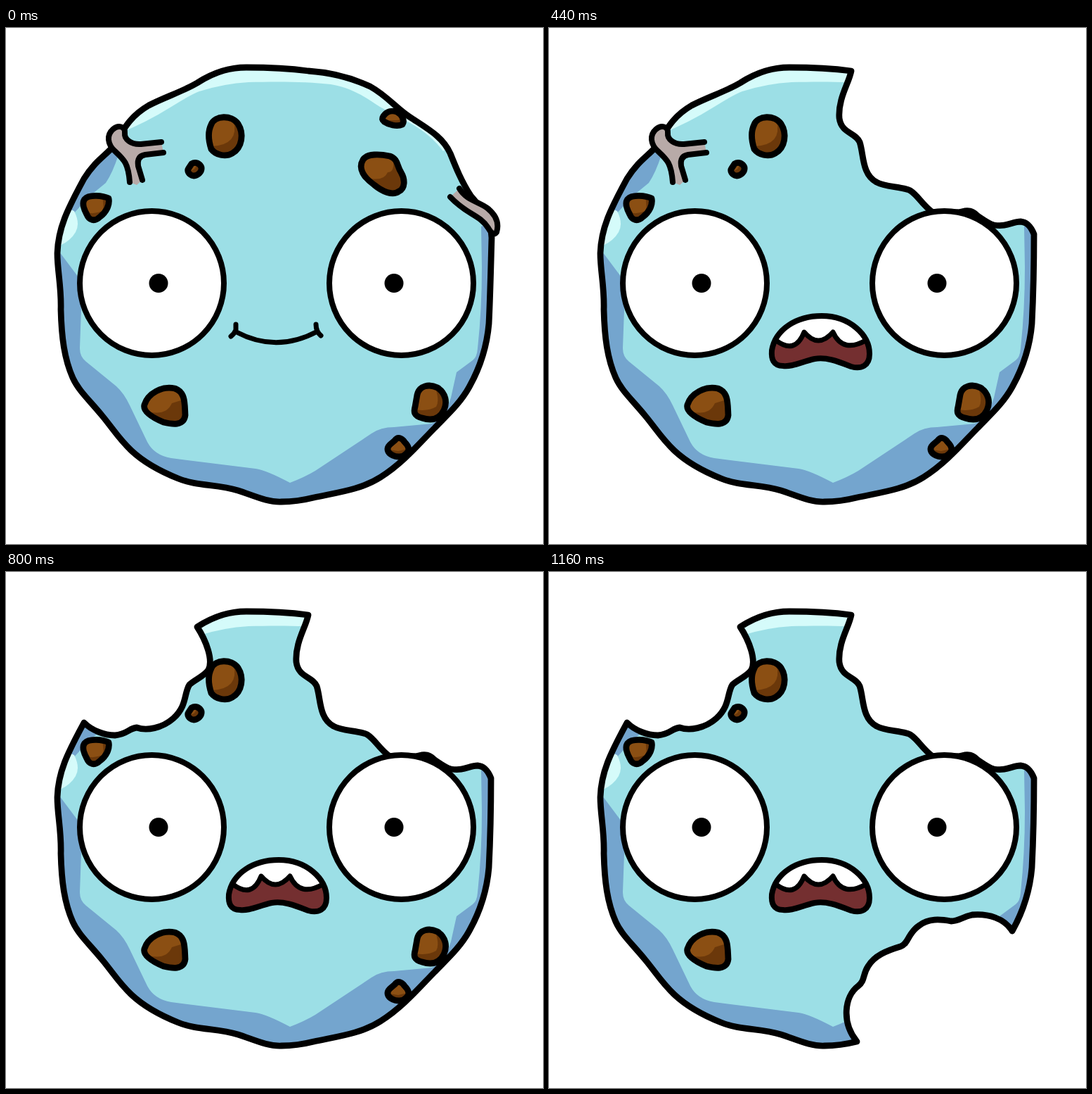
An HTML page for the animation above (1.76 s loop, 764x733 px).

```html
<!DOCTYPE html>
<html lang="en">
<head>
<meta charset="utf-8">
<title>Bitten cookie</title>
<style>
  html, body { margin: 0; width: 100%; height: 100%; overflow: hidden; background: #fff; }
  svg { display: block; width: 100%; height: 100%; }
  .line { fill: none; stroke: #000; stroke-width: 8; stroke-linecap: round; stroke-linejoin: round; }
  .bold { stroke-width: 8.8; }
  .fine { stroke-width: 7; }
  .dark { fill: #74a5ce; }
  .light { fill: #d5fbfa; }
  .vein { fill: #b8aaa8; }
</style>
</head>
<body>
<svg viewBox="0 0 764 733">
  <defs>
    <path id="body"/>
    <clipPath id="inside"><use href="#body"/></clipPath>
    <path id="lips" d="M317,458 C322,428 352,409 388,409 C428,409 456,436 456,463 C456,480 444,485 430,481 C412,474 395,467 378,470 C360,474 345,482 333,480 C319,480 316,470 317,458Z"/>
    <clipPath id="mouth"><use href="#lips"/></clipPath>
  </defs>
  <g id="cookie">
    <use href="#body" fill="#9cdfe6"/>
    <g clip-path="url(#inside)">
      <path class="dark" d="M60,300 L76,318 L100,350 Q106,358 107,400 L105,455 Q105,467 114,474 L157,509 Q168,519 176,536 L201,588 Q211,607 235,611 L355,626 Q370,628 404,646 Q425,638 440,629 L520,576 Q533,567 552,567 L606,562 Q625,552 633,525 L641,489 L664,472 Q670,468 671,455 Q677,400 677,340 L676,282 L700,270 V700 H60Z"/>
      <path class="dark" d="M150,160 L160,180 Q152,205 142,220 L120,238 L92,268 L80,240Z"/>
      <path class="light" d="M97,260 Q106,278 99,290 Q92,302 77,309 L68,300 L85,255Z"/>
      <path class="light" d="M160,150 Q200,134 235,112 Q262,95 275,90 Q310,79 345,77 C385,76 430,76 462,80 C495,86 510,98 532,112 L575,135 Q605,152 622,175 L660,140 L520,40 H300 L160,110Z"/>
    </g>
    <use href="#body" class="line bold"/>
    <g data-until="2">
      <path class="vein" d="M176,219 C174,192 168,187 155,175 C144,165 143,152 152,144 C160,137 170,140 169,149 C168,158 178,166 192,165 L221,162 L224,177 L198,180 Q186,182 188,196 L194,216 L186,223Z"/>
      <path class="line" d="M176,219 C174,192 168,187 155,175 C144,165 143,152 152,144 C160,137 170,140 169,149 C168,158 178,166 192,165 L221,162 M224,177 L198,180 Q186,182 188,196 L194,216"/>
    </g>
    <path data-until="1" class="line" style="fill:#b8aaa8" d="M645,228 C655,245 672,246 685,256 C700,268 701,280 698,290 C694,295 690,291 686,284 C674,265 655,265 632,240"/>
    <path data-from="1" d="M578,261 C592,252 604,254 613,264 L634,280 L600,274Z"/>
    <g id="chips"></g>
    <g id="eyes"></g>
    <path data-until="1" class="line fine" d="M328,432 Q385,462 443,431 M327,421 V429 Q325,434 320,438 M441,421 Q441,431 448,437"/>
    <g data-from="1">
      <use href="#lips" fill="#fff"/>
      <path clip-path="url(#mouth)" class="line fine" style="fill:#742f30" d="M322,443 Q350,465 363,432 Q383,456 404,432 Q418,463 452,443 L480,500 H290Z"/>
      <use href="#lips" class="line"/>
    </g>
  </g>
</svg>
<script>
const $ = id => document.getElementById(id);

// Rim pieces, clockwise from the lowest point; each bite swaps a whole piece for a bitten one.
const rim = {
  left: 'M392,673 C372,674 352,664 330,657 C300,648 272,651 245,640 C220,630 195,616 178,600 C160,583 152,569 137,551 C120,530 103,515 95,497 C83,470 79,440 78,400 C79,368 73,345 73,320 C74,285 87,258 111,214',
  topLeft: ['C126,190 140,182 150,171 C165,150 172,128 203,110 C226,98 252,90 272,78',
    'C122,225 140,232 155,232 C172,231 175,222 186,221 C200,226 222,222 238,208 C258,190 253,172 261,160 C270,152 282,148 288,139 C295,125 285,98 272,78'],
  top: 'C300,60 322,56 342,56 C375,56 400,57 430,61',
  topRight: ['C460,63 490,70 518,83 C545,98 556,116 580,130 C603,145 622,156 632,178 C640,198 648,218 661,238 C675,255 690,270 691,298',
    'C427,78 411,100 413,128 C416,150 436,148 442,162 C448,180 445,208 466,219 C480,227 500,224 514,231 C525,238 532,252 546,262 L582,262 C606,256 615,275 633,280 C652,283 659,275 671,275 C681,276 686,283 690,293'],
  right: 'C690,330 689,380 687,420 C684,455 673,485 659,510',
  lowRight: ['C645,535 625,552 610,568 C590,588 565,618 533,638 C505,656 470,660 438,667',
    'C648,492 625,485 602,487 C588,490 583,496 572,496 C556,493 540,492 527,502 C510,513 512,528 500,532 C480,538 463,545 454,560 C446,572 450,580 440,588 C420,603 416,640 438,667'],
  bottom: 'C422,671 408,673 392,673Z'
};

const outline = bites => [
  rim.left, rim.topLeft[+(bites > 1)], rim.top, rim.topRight[+(bites > 0)],
  rim.right, rim.lowRight[+(bites > 2)], rim.bottom
].join(' ');

// Chip shape, its lit side, and the bite that removes it.
const chips = [
  ['M292,137 C297,124 321,123 330,136 C339,150 336,170 322,178 C312,184 298,180 292,172 C288,160 287,147 292,137Z',
    'M292,137 C298,124 318,122 324,132 Q332,166 293,168Z', 9],
  ['M264,193 C270,189 276,193 278,198 C279,204 273,210 267,210 C260,209 257,203 260,199Z',
    'M264,193 L271,191 Q271,203 260,203Z', 9],
  ['M112,243 C118,236 138,238 146,242 C148,252 142,262 134,268 C126,276 118,273 115,265 C110,256 108,248 112,243Z',
    'M112,243 L137,240 Q140,255 137,260 Q125,265 115,262Z', 9],
  ['M537,125 C542,118 550,117 556,119 C563,123 568,131 564,137 C556,141 544,137 538,133 C534,130 535,128 537,125Z',
    'M538,125 Q550,116 561,125 Q563,131 555,131 L537,131Z', 1],
  ['M508,187 C514,178 532,179 546,182 C558,186 556,196 562,205 C568,215 568,228 559,232 C550,239 535,232 524,223 C510,213 500,200 508,187Z',
    'M508,187 Q535,178 551,187 Q553,205 543,205 Q538,217 519,214 Q505,198 508,187Z', 1],
  ['M197,535 C202,519 222,508 240,512 C256,517 254,535 255,550 C253,566 236,563 224,560 C210,554 194,545 197,535Z',
    'M197,535 C203,520 218,510 240,512 Q249,516 252,528 L236,533 Q228,551 203,545Z', 9],
  ['M585,521 C588,508 602,505 614,511 C626,519 628,532 623,543 C616,557 604,558 592,554 C580,551 580,545 582,538Z',
    'M585,521 Q595,505 611,511 Q617,530 612,538 Q600,545 583,542Z', 3],
  ['M553,586 C557,580 563,582 567,588 C573,594 575,600 570,604 C565,610 556,610 550,607 C542,603 541,597 546,592Z',
    'M553,586 L562,585 Q570,594 571,598 L558,601 L545,599Z', 3]
];

$('chips').innerHTML = chips.map(([shape, lit, until]) => `<g data-until="${until}">
  <path d="${shape}" fill="#6b380a"/><path d="${lit}" fill="#8b4f13"/><path d="${shape}" class="line bold"/></g>`).join('');

$('eyes').innerHTML = [[207.5, 217], [562.5, 552]].map(([eye, pupil]) =>
  `<circle cx="${eye}" cy="362.5" r="102.5" class="line" style="fill:#fff"/>
   <circle cx="${pupil}" cy="362.5" r="13.5"/>`).join('');

// Start in ms, tilt in degrees, bites taken.
const steps = [
  [0, 0, 0],
  [320, 1.55, 1], [360, -0.9, 1], [440, 0, 1],
  [680, -2.25, 2], [760, 0.6, 2], [800, 0, 2],
  [1080, -1.3, 3], [1120, 0.9, 3], [1160, 0, 3]
];
const loop = 1760;
const changing = document.querySelectorAll('[data-from], [data-until]');
let shown;

function draw(now) {
  const time = now % loop;
  const step = steps.findLast(([start]) => start <= time);
  if (step !== shown) {
    const [, tilt, bites] = shown = step;
    $('body').setAttribute('d', outline(bites));
    $('cookie').setAttribute('transform', `rotate(${tilt} 383 694)`);
    for (const part of changing) {
      const { from = 0, until = 9 } = part.dataset;
      part.style.display = bites >= from && bites < until ? '' : 'none';
    }
  }
}

const origin = performance.now();
function tick() {
  draw(performance.now() - origin);
  requestAnimationFrame(tick);
}
tick();
</script>
</body>
</html>
```
